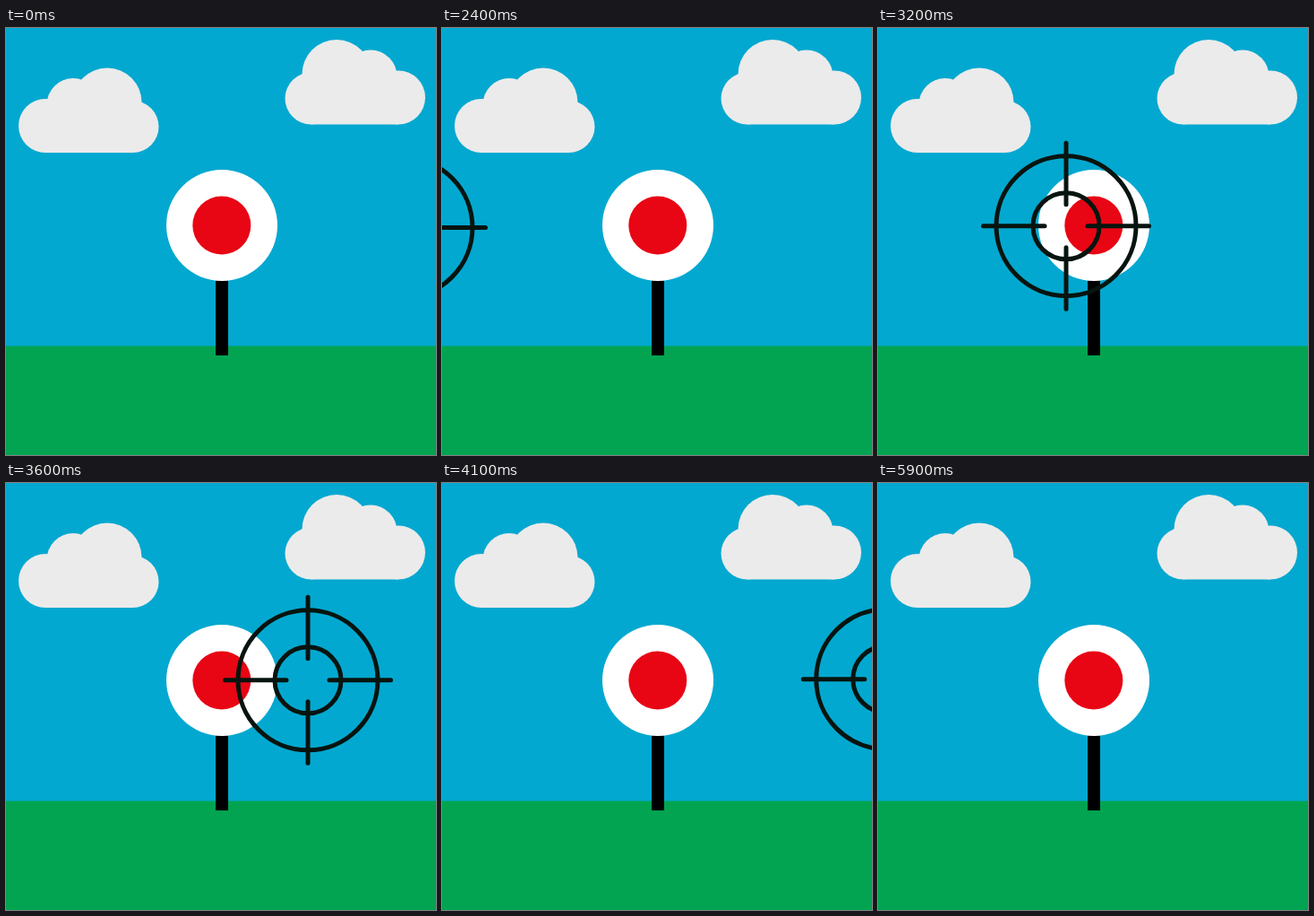
Recreate the animation shown at these times as an HTML page. Size 480 by 476 pixels, loop 6000 ms.

```html
<!DOCTYPE html>
<html lang="en">
<head>
<meta charset="utf-8">
<title>Target and crosshair</title>
<style>
  html, body { margin: 0; height: 100%; overflow: hidden; }
  svg { display: block; width: 100%; height: 100%; }
</style>
</head>
<body>
<svg viewBox="0 0 480 476">
  <defs>
    <g id="cloud" fill="#ebebeb">
      <circle cx="44" cy="109" r="30"/>
      <circle cx="75" cy="85.5" r="29.5"/>
      <circle cx="113" cy="83" r="38.5"/>
      <circle cx="141.5" cy="110" r="29"/>
      <path d="M44 90H141.5V139H44Z"/>
    </g>
    <path id="arm" d="M24 0H92.5"/>
  </defs>
  <rect width="480" height="476" fill="#03a8d0"/>
  <rect y="354.5" width="480" height="122" fill="#02a451"/>
  <use href="#cloud"/>
  <use href="#cloud" transform="translate(482 -31.5) scale(-1 1)"/>
  <rect x="234" y="270" width="14" height="95"/>
  <circle cx="241" cy="220" r="62" fill="#fff"/>
  <circle cx="240.8" cy="220" r="32.5" fill="#e80514"/>
  <g id="sight" fill="none" stroke="#07140f" stroke-width="5" stroke-linecap="round">
    <circle r="78"/>
    <circle r="37"/>
    <use href="#arm"/>
    <use href="#arm" transform="rotate(90)"/>
    <use href="#arm" transform="rotate(180)"/>
    <use href="#arm" transform="rotate(270)"/>
  </g>
</svg>
<script>
  const LOOP = 6000, STEP = 100;
  const sight = document.getElementById('sight');
  const start = performance.now();

  function draw(now) {
    const t = Math.floor(Math.max(0, now - start) % LOOP / STEP) * STEP;
    // Steady drift to the right, rising slightly
    const dt = t - 3200;
    const x = 210 + dt * 0.3175;
    const y = 220.7 - dt * 0.0022;
    sight.setAttribute('transform', `translate(${x} ${y})`);
    requestAnimationFrame(draw);
  }
  draw(start);
</script>
</body>
</html>
```
